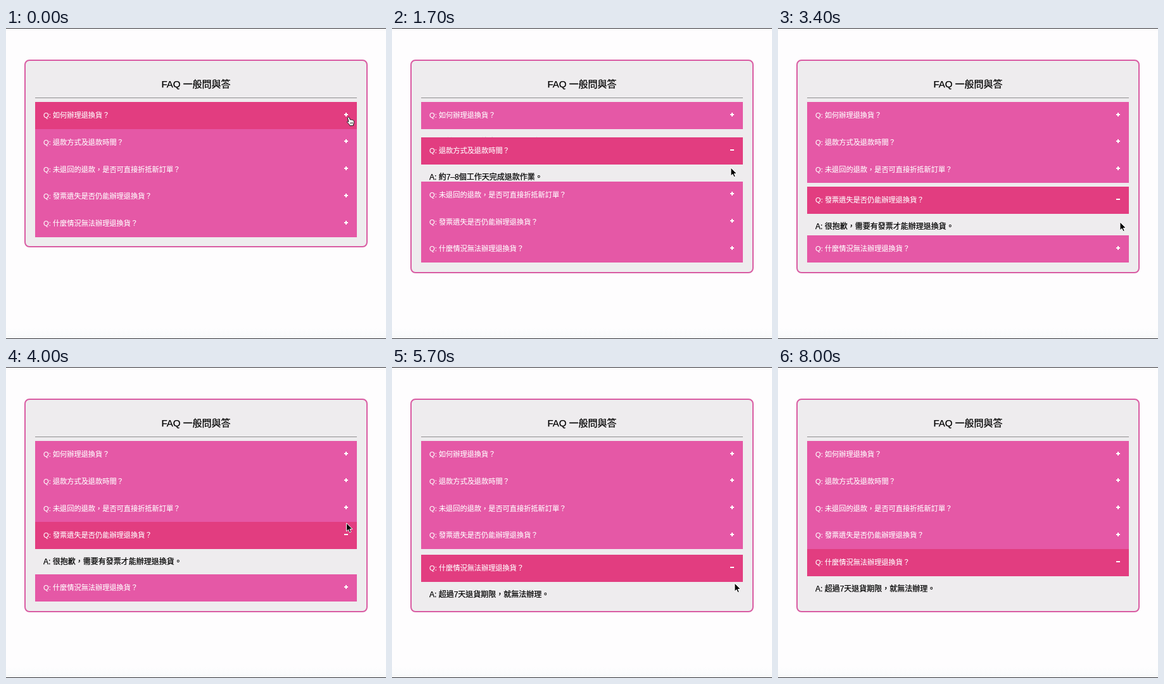
Write an HTML page that moves like this. It is 600 px wide and 492 px high and loops after 8100 ms.

```html
<!DOCTYPE html>
<html lang="zh-Hant">
<head>
<meta charset="utf-8">
<title>FAQ</title>
<style>
  html, body { margin: 0; width: 100%; height: 100%; overflow: hidden; }
  body {
    position: relative;
    background: linear-gradient(#fefdfe 474px, #f8fafb 491px);
    font-family: "Liberation Sans", "Noto Sans CJK TC", "Noto Sans CJK", sans-serif;
  }
  .edge { position: absolute; left: 0; width: 100%; height: 1px; background: #303036; }
  .top { top: 0; }
  .bottom { top: 491px; }
  .card {
    position: absolute; left: 29px; top: 50px; width: 542px;
    box-sizing: border-box; padding: 65.3px 14.7px 14.7px;
    border: 2px solid #d95ca3; border-radius: 8px; background: #eeecee;
  }
  h1 {
    position: absolute; left: 0; top: 22px; width: 100%; margin: 0;
    font-size: 15px; font-weight: 400; line-height: 30px; text-align: center;
    color: #000; -webkit-text-stroke: .25px;
  }
  .rule { position: absolute; left: 15px; right: 15px; top: 58px; height: 1px; background: #8f8e90; }
  .q, .a { padding-left: 13.3px; white-space: nowrap; }
  .q {
    position: relative; height: 42.7px; line-height: 42.7px;
    font-size: 11.2px; color: #fff; background: #e558a6; -webkit-text-stroke: .12px;
  }
  .q.dark { background: #e23d80; }
  .q::before, .q::after { content: ""; position: absolute; background: #fff; }
  .q::before { right: 14px; top: 18.5px; width: 6px; height: 2px; }
  .q::after { right: 16px; top: 16.5px; width: 2px; height: 6px; }
  .q.open::after { display: none; }
  .a {
    height: 0; overflow: hidden; line-height: 40px;
    font-size: 12px; color: #000; -webkit-text-stroke: .25px;
  }
  svg { position: absolute; left: 0; top: 0; width: 20px; height: 20px; overflow: visible; }
</style>
</head>
<body>
<div class="edge top"></div>
<div class="card">
  <h1>FAQ 一般問與答</h1>
  <div class="rule"></div>
  <div class="q">Q: 如何辦理退換貨？</div>
  <div class="a">A: 請於7天內聯絡客服辦理退換貨。</div>
  <div class="q">Q: 退款方式及退款時間？</div>
  <div class="a">A: 約7–8個工作天完成退款作業。</div>
  <div class="q">Q: 未退回的退款，是否可直接折抵新訂單？</div>
  <div class="a">A: 很抱歉，重新訂購時無法直接於新訂單扣抵。</div>
  <div class="q">Q: 發票遺失是否仍能辦理退換貨？</div>
  <div class="a">A: 很抱歉，需要有發票才能辦理退換貨。</div>
  <div class="q">Q: 什麼情況無法辦理退換貨？</div>
  <div class="a">A: 超過7天退貨期限，就無法辦理。</div>
</div>
<div class="edge bottom"></div>
<svg id="cursor">
  <path id="arrow" transform="translate(0 -1)" d="M0 0V13L3 10.3L5 14.8L7.2 13.9L5.3 9.5H9.4Z" fill="#000" stroke="#fff"/>
  <g id="hand" transform="translate(-3 -2)" stroke="#111" stroke-linejoin="round">
    <path fill="#fff" d="M2 1.5C3 .5 4 1 4.3 2L5.3 5.2C6 4.6 7 4.8 7.3 5.5C8 5 9 5.2 9.3 6
      C10.3 5.6 11 6.2 11.2 7C11.8 9 11.6 10.5 10.8 12L10.5 14.2L5 14.6
      C4.5 12.8 2.5 11 .8 9.2C0 8.3 1 7.3 2.2 8L3 8.6L1.6 3C1.4 2.3 1.5 1.9 2 1.5Z"/>
    <path fill="none" stroke-width=".7" d="M5.8 9L6.2 12M7.6 8.8L7.9 11.8M9.3 8.6L9.5 11.6"/>
  </g>
</svg>
<script>
  const LOOP = 8100, STEP = 100, SLIDE = 400, HOVER_LAG = 100;
  const LIST_TOP = 117.3, ROW = 42.7, ANSWER = 40.3;
  const clicks = [400, 1455, 2502, 3100, 5425];
  const home = { x: 541, y: 142 };
  // each move eases the pointer from its last resting place
  const moves = [
    { at: 950, time: 400, x: 535, y: 222 },
    { at: 1900, time: 400, x: 537, y: 266.3 },
    { at: 2750, time: 250, x: 540, y: 308 },
    { at: 3800, time: 500, x: 533, y: 134 },
    { at: 4560, time: 550, x: 541, y: 343 },
    { at: 6600, time: 600, x: 541, y: -40 }
  ];
  const questions = [...document.querySelectorAll(".q")];
  const answers = [...document.querySelectorAll(".a")];
  const [cursor, arrow, hand] = ["cursor", "arrow", "hand"].map(id => document.getElementById(id));

  const swing = p => 0.5 - Math.cos(Math.PI * Math.min(1, Math.max(0, p))) / 2;
  const slide = (t, i) => i < clicks.length ? swing((t - clicks[i]) / SLIDE) : 0;

  const pointer = t => moves.reduce((from, to) => {
    const p = swing((t - to.at) / to.time);
    return { x: from.x + (to.x - from.x) * p, y: from.y + (to.y - from.y) * p };
  }, home);

  function draw(t) {
    const active = clicks.filter(c => c <= t).length - 1;
    const { x, y } = pointer(t);
    const hoverY = pointer(t - HOVER_LAG).y;
    let top = LIST_TOP, onRow = false;
    questions.forEach((q, i) => {
      const hover = hoverY >= top && hoverY < top + ROW;
      const height = ANSWER * (slide(t, i) - slide(t, i + 1));
      q.classList.toggle("dark", hover || i === active);
      q.classList.toggle("open", i === active);
      answers[i].style.height = height + "px";
      onRow = onRow || hover;
      top += ROW + height;
    });
    cursor.style.transform = `translate(${x}px, ${y}px)`;
    hand.style.display = onRow ? "" : "none";
    arrow.style.display = onRow ? "none" : "";
  }

  function tick() {
    draw(Math.floor(performance.now() % LOOP / STEP) * STEP);
    requestAnimationFrame(tick);
  }
  tick();
</script>
</body>
</html>
```
